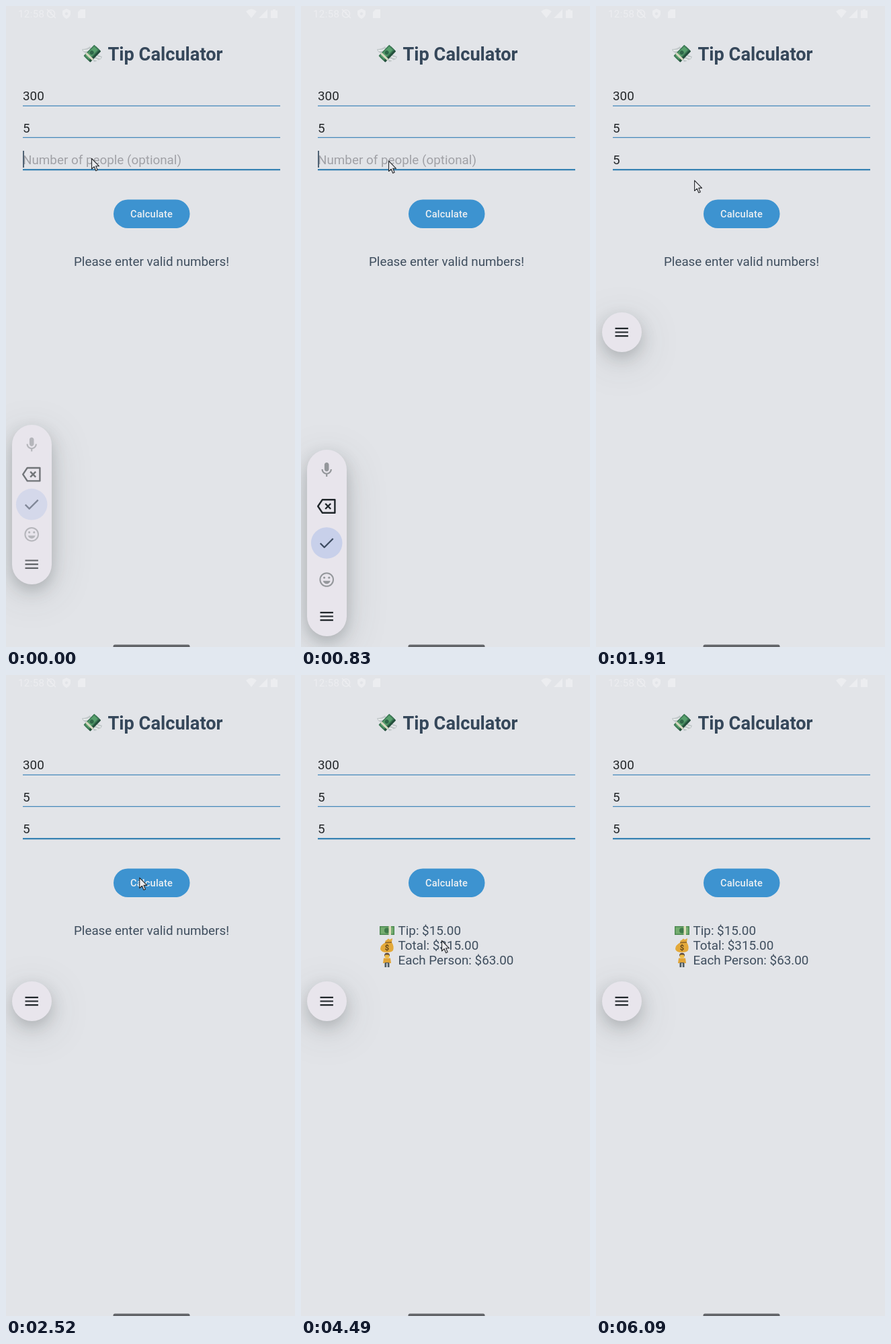
Write an HTML page that moves like this. It is 430 px wide and 952 px high and loops after 6.16 s.

```html
<!DOCTYPE html>
<html lang="en">
<head>
<meta charset="utf-8">
<title>Tip Calculator</title>
<style>
  html, body { margin: 0; width: 100%; height: 100%; overflow: hidden; background: #e2e4e8; }
  svg { position: absolute; left: 0; top: 0; font: 18.83px Roboto, sans-serif; }
  #pill {
    position: absolute; left: 8.5px; width: 59.5px; border-radius: 29.75px; background: #e8e5ec;
    box-shadow: 0 9px 22px rgba(65, 72, 72, .26), 0 14px 62px rgba(65, 72, 72, .17);
  }
  .line { fill: none; stroke-linejoin: round; }
</style>
</head>
<body>
<div id="pill"></div>
<svg width="430" height="952" viewBox="0 0 430 952">
  <!-- status bar -->
  <g fill="#ecedf0" stroke="#ecedf0" stroke-width="0">
    <text x="18" y="17" font-size="15" letter-spacing=".4">12:58</text>
    <circle cx="67" cy="11.5" r="5.5" class="line" stroke-width="1.5"/>
    <path class="line" stroke-width="1.5" d="M61 5L74 18M67 8V12L70 13"/>
    <path d="M90 4L96 7V12Q95 17 90 19Q85 17 84 12V7Z"/>
    <path d="M111 5H118V18H107V9Z"/>
    <path d="M357 8Q365 1 373 8L365 18ZM389 5V18H376ZM397 5H401V6.5H404V18H394V6.5H397Z"/>
    <circle cx="90" cy="11.5" r="2.2" fill="#e2e4e8"/>
  </g>

  <!-- winged banknotes -->
  <g transform="translate(128 71)">
    <path fill="#c3c9cb" d="M-15-7Q-8-7-3-11L1-4L-4 3Q-8 2-9-1Q-14-2-15-7ZM15 4Q10 3 5-1L0 5L3 12Q7 12 8 9Q14 10 15 4Z"/>
    <path fill="none" stroke="#f3f5f5" stroke-width="1.3" d="M-13-5Q-7-4-3-7M-8-1L-3-3M13 6Q9 6 5 3M8 9L3 8"/>
    <g transform="rotate(-46)">
      <rect x="-11" y="-4" width="23" height="11" rx="1" fill="#24503c"/>
      <rect x="-11" y="-7" width="23" height="11" rx="1" fill="#3d7a56"/>
      <rect x="-9" y="-5.3" width="19" height="7.5" fill="#58a06d"/>
      <circle cx="1" cy="-1.5" r="3" fill="#2f6849"/>
      <path fill="#d9d9c2" d="M-7-7H-4V7H-7Z"/>
    </g>
  </g>
  <text x="151.5" y="80.5" font-size="27.2" font-weight="700" fill="#35475a">Tip Calculator</text>

  <!-- fields -->
  <g fill="#25282b">
    <text x="25" y="140">300</text>
    <text x="25" y="187.5">5</text>
    <text id="people" x="25" y="235"></text>
  </g>
  <path stroke="#4589bb" stroke-width="1.3" d="M25 148.4H408M25 195.4H408"/>
  <path stroke="#3782b3" stroke-width="2.2" d="M25 243.2H408"/>
  <rect id="caret" y="215" width="2" height="25" fill="#506274"/>

  <!-- button -->
  <rect x="160" y="287.5" width="113.5" height="42.5" rx="21.2" fill="#3d93d0"/>
  <rect id="ripple" x="160" y="287.5" width="113.5" height="42.5" rx="21.2" fill="#fff"/>
  <text x="216.5" y="314.4" text-anchor="middle" font-size="14.65" font-weight="500" letter-spacing=".17" fill="#eceff2">Calculate</text>

  <!-- messages -->
  <text id="error" x="216.5" y="386" text-anchor="middle" fill="#3f4e5e">Please enter valid numbers!</text>
  <g id="result" fill="#3f4e5e">
    <text x="144.5" y="386">Tip: $15.00</text>
    <text x="144.5" y="408">Total: $315.00</text>
    <text x="144.5" y="430">Each Person: $63.00</text>
    <rect x="117" y="373" width="22" height="13" fill="#4d8a52"/>
    <rect x="118.5" y="374.5" width="19" height="10" fill="#75ad70"/>
    <circle cx="128" cy="379.5" r="4" fill="#3f7a4a"/>
    <path fill="#e0ddbd" d="M130.5 373H134V386H130.5Z"/>
    <path fill="#e3a93a" d="M126 397Q124 395 127 394L130 391.5L132 393L136 391L135 397Q139 403 137 409Q135 412 128 412Q119 412 118 407Q118 401 126 397Z"/>
    <path stroke="#8d6224" stroke-width="1.6" d="M125 397.5L135 397"/>
    <text x="128" y="409" text-anchor="middle" font-size="11" font-weight="700" fill="#604419">$</text>
    <path fill="#4f5b62" d="M124.5 425H131.5V434H128.8V428H127.2V434H124.5Z"/>
    <path fill="#e0a437" d="M123 420.5H133L134 428H131.5V427H124.5V428H122Z"/>
    <circle cx="128" cy="417" r="3.6" fill="#edbd45"/>
    <path fill="#5f4a3c" d="M124 418Q123.5 412.8 128 412.8Q132.500 412.8 132 418L130.500 415.500H125.500Z"/>
  </g>

  <!-- floating keyboard bar -->
  <g class="icon" fill="#94979b">
    <path transform="scale(1.1) translate(-12 -11.5)" d="M12 14c1.66 0 3-1.34 3-3V5c0-1.66-1.34-3-3-3S9 3.34 9 5v6c0 1.660 1.340 3 3 3zm5-3c0 2.760-2.240 5-5 5s-5-2.240-5-5H5c0 3.530 2.610 6.430 6 6.920V21h2v-3.080c3.390-.490 6-3.390 6-6.920h-2z"/>
  </g>
  <g class="icon line" stroke="#20262a" stroke-width="2.4">
    <path d="M-13 0L-6.500-9.700H12.200V9.700H-6.500ZM-2-4L6 4M6-4L-2 4"/>
  </g>
  <g class="icon">
    <circle r="23.3" fill="#c8d0ea"/>
    <path class="line" stroke="#3d4b60" stroke-width="2.3" d="M-9.500 .5L-3.500 6.500L9.500-6.500"/>
  </g>
  <g class="icon" fill="#94979b">
    <circle r="9.8" class="line" stroke="#94979b" stroke-width="2"/>
    <circle cx="-3.6" cy="-3" r="1.6"/>
    <circle cx="3.6" cy="-3" r="1.6"/>
    <path d="M-5.500 1.800H5.500Q4 6.200 0 6.200Q-4 6.200-5.500 1.800Z"/>
  </g>
  <g class="icon line" stroke="#20262a" stroke-width="2.2">
    <path d="M-9.700-5.700H9.700M-9.700 0H9.700M-9.700 5.700H9.700"/>
  </g>

  <rect x="159.5" y="948.5" width="114" height="6" rx="2.500" fill="#626468"/>
  <path id="cursor" fill="#e9eaed" stroke="#26282b" stroke-width="1.1" stroke-linejoin="round"
    d="M.5 .5V16L4.200 12.700L6.700 18.700L9.200 17.600L6.700 11.800H11.500Z"/>
</svg>
<script>
const LOOP = 6160, TYPED = 1100, RESULT = 2850, CURSOR_GONE = 4870;
const $ = id => document.getElementById(id);
const icons = [...document.querySelectorAll('.icon')];
const clamp = v => Math.min(1, Math.max(0, v));
const mix = (a, b, k) => a + (b - a) * k;
const easeInOut = p => p < .5 ? 4 * p ** 3 : 1 - 4 * (1 - p) ** 3;
const show = (el, on) => el.setAttribute('visibility', on ? 'visible' : 'hidden');

// time, x, y
const track = [
  [0, 127, 226], [830, 130, 229.5], [1200, 132, 236], [1450, 136, 253], [1510, 136, 253],
  [1910, 146, 258.5], [2600, 205, 306], [2950, 205, 306], [3240, 206, 340],
  [3570, 209, 394], [LOOP, 209, 394]
];

function cursorAt(t) {
  const i = track.findIndex(p => p[0] > t);
  const [a, b] = [track[i - 1], track[i]];
  const k = (t - a[0]) / (b[0] - a[0]);
  return [mix(a[1], b[1], k), mix(a[2], b[2], k)];
}

// 1 = bar fully open, 0 = collapsed to a round button
function openness(t) {
  return t < 1460
    ? 1 - .185 * (1 - clamp(t / 300)) ** 3
    : 1 - easeInOut(clamp((t - 1460) / 380));
}

function drawBar(t) {
  const k = openness(t);
  const top = mix(455, 659, k), height = mix(59, 277, k);
  $('pill').style.top = top + 'px';
  $('pill').style.height = height + 'px';
  const menuY = top + height - 29.5, gap = (height - 59) / 4;
  const fade = clamp(1 - (1 - k) * 2.2);
  icons.forEach((icon, i) => {
    icon.setAttribute('transform', `translate(38.2 ${menuY - (4 - i) * gap})`);
    icon.setAttribute('opacity', i < 4 ? fade : Math.max(fade, 1 - k * .4));
  });
}

function draw(now) {
  const t = now % LOOP, typed = t >= TYPED;
  drawBar(t);

  $('people').textContent = typed ? '5' : 'Number of people (optional)';
  $('people').setAttribute('fill', typed ? '#25282b' : '#a0a1a6');
  $('caret').setAttribute('x', typed ? 35 : 25);
  show($('caret'), t < 300 || (t >= 800 && t < 1600));

  const ripple = t < 2900 ? clamp((t - 2750) / 150) : clamp((3570 - t) / 670);
  $('ripple').setAttribute('opacity', .16 * ripple);
  show($('error'), t < RESULT);
  show($('result'), t >= RESULT);

  $('cursor').setAttribute('transform', `translate(${cursorAt(t)})`);
  show($('cursor'), t < CURSOR_GONE);
  requestAnimationFrame(frame);
}

const start = performance.now();
function frame() { draw(performance.now() - start); }
frame();
</script>
</body>
</html>
```
